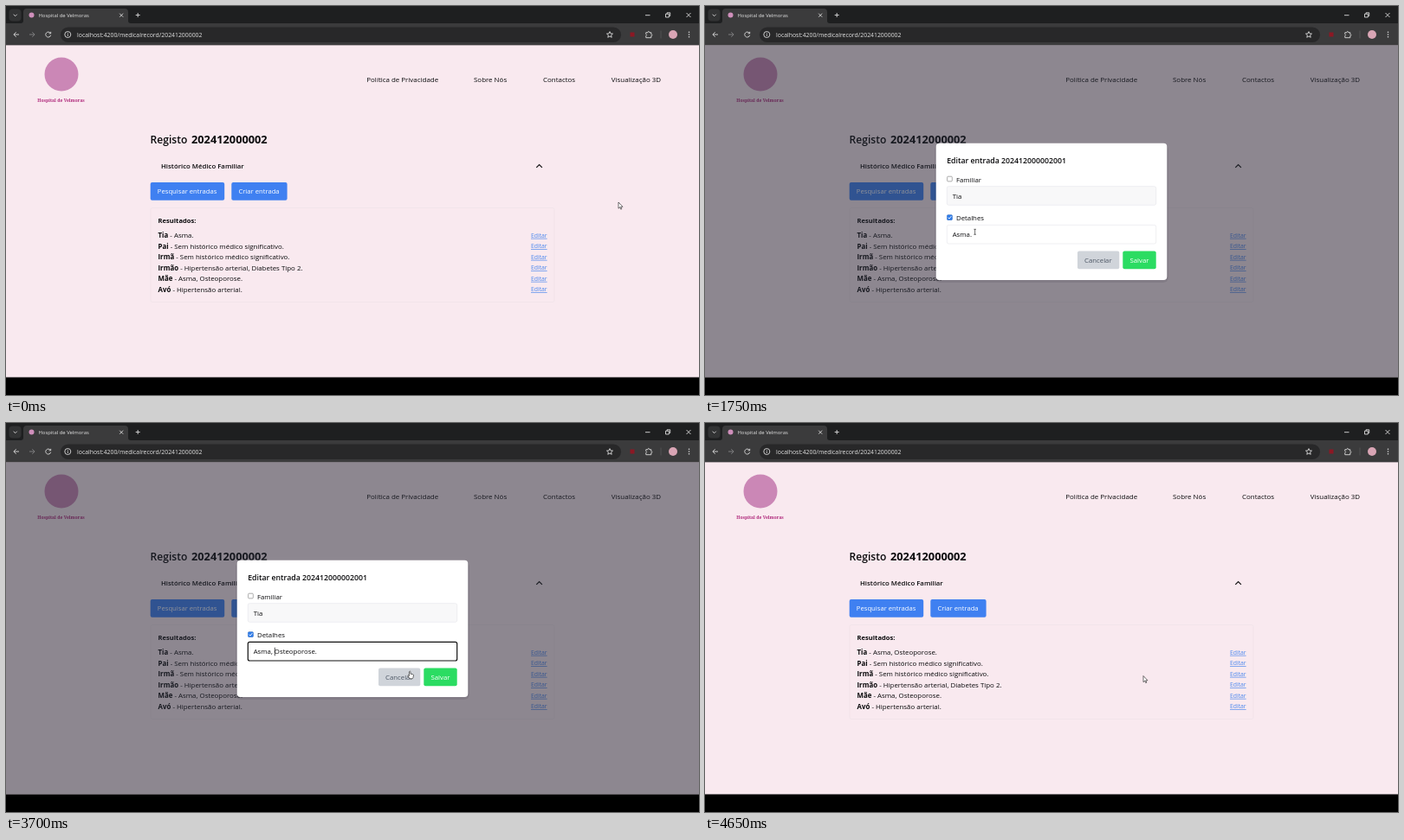
Write an HTML page that moves like this. It is 800x450 px and loops after 5000 ms.

```html
<!DOCTYPE html>
<html lang="pt">
<head>
<meta charset="utf-8">
<title>Hospital de Velmoras</title>
<style>
  html, body { margin: 0; width: 100%; height: 100%; overflow: hidden; background: #000; }
  svg { display: block; width: 800px; height: 450px; font: 7.8px "Open Sans", "Noto Sans", sans-serif; fill: #0b0b0d; }
  .nav { font-size: 7.95px; }
  .row { font-size: 7.9px; }
  .bold { font-weight: 700; }
  .semi { font-weight: 600; }
  .link { font-size: 6.8px; fill: #4b87ee; text-decoration: underline; }
  .white { fill: #fff; }
  .line { fill: none; stroke: #dcdcdc; stroke-width: .9; }
  .field { fill: #f8f8f9; stroke: #e4e5e9; stroke-width: .6; }
  .box { fill: #fff; stroke: #767676; stroke-width: .6; }
</style>
</head>
<body>
<svg viewBox="0 0 800 450">
  <!-- browser bar -->
  <rect width="800" height="45" fill="#1e1f20"/>
  <rect y="20" width="800" height="25.3" fill="#3b3b3c"/>
  <path d="M17 20q3 0 3-3V7q0-4 4-4h113q4 0 4 4v10q0 3 3 3z" fill="#3b3b3c"/>
  <rect x="3.500" y="3.500" width="14" height="14" rx="4" fill="#323334"/>
  <rect x="63" y="24.500" width="647" height="17.500" rx="8.750" fill="#282829"/>
  <circle cx="29.500" cy="10.500" r="3" fill="#cf8fbb"/>
  <text x="37.500" y="12.800" font-size="5.9" fill="#e3e3e3">Hospital de Velmoras</text>
  <text x="82" y="35.600" font-size="6.89" fill="#e3e3e3">localhost:4200/medicalrecord/202412000002</text>
  <g class="line">
    <path d="M8.700 9.700l2 2 2-2M131.200 8.700l4 4m0-4l-4 4M149.700 10.500h5M152.200 8v5"/>
    <path d="M738 10.700h5.500M761.500 9.200h3.800v3.800h-3.800zM763 9V7.800h3.700v3.700h-1.200M785.500 8l5 5m0-5l-5 5"/>
    <path d="M15 33H9m2.700-2.800L8.900 33l2.800 2.800M51.300 31.400a3 3 0 1 0 .4 2.400M51.700 29.800v2h-2"/>
    <path d="M27 33h6m-2.700-2.800l2.800 2.800-2.800 2.800" stroke="#858586"/>
    <circle cx="71.300" cy="33" r="3.500"/><path d="M71.300 32.500v2.300M71.300 30.900v.8"/>
    <path d="M697 29.600l1 2.300 2.500.2-1.900 1.700.6 2.500-2.200-1.300-2.200 1.300.6-2.500-1.900-1.700 2.500-.2z"/>
    <path d="M738.800 30.700h2v-.6q1-1.400 2 0v.6h2v2h.4q1.400 1 0 2h-.4v2h-6v-2.200q1.600-.8 0-1.800z"/>
    <path d="M756 28.500v9" stroke="#555"/>
  </g>
  <rect x="720.500" y="30.500" width="5" height="5" fill="#8c1824"/>
  <circle cx="770" cy="33" r="5" fill="#d9a5b5"/>
  <g fill="#dcdcdc"><circle cx="788.500" cy="30.300" r=".8"/><circle cx="788.500" cy="33" r=".8"/><circle cx="788.500" cy="35.700" r=".8"/></g>

  <!-- page -->
  <rect y="45.300" width="800" height="384.200" fill="#f9e9ef"/>
  <circle cx="64" cy="79" r="19.500" fill="#cb87b6"/>
  <text x="63.500" y="110.700" text-anchor="middle" font-family="Noto Serif, serif" font-size="5.05" font-weight="700" fill="#b02a7c">Hospital de Velmoras</text>
  <g class="nav">
    <text x="416.300" y="88.300">Política de Privacidade</text>
    <text x="540" y="88.300">Sobre Nós</text>
    <text x="620" y="88.300">Contactos</text>
    <text x="698.800" y="88.300">Visualização 3D</text>
  </g>
  <text x="166.500" y="158.800" font-size="12.1" class="semi">Registo</text>
  <text x="214" y="158.800" font-size="12.8" class="bold">202412000002</text>
  <text x="179" y="188.200" class="semi">Histórico Médico Familiar</text>
  <path d="M612.300 186.800l3.300-3.300 3.300 3.300" fill="none" stroke="#111" stroke-width="1.200"/>
  <g fill="#3f80f1">
    <rect x="166.700" y="204" width="85.500" height="20.700" rx="2"/>
    <rect x="260.300" y="204" width="64.300" height="20.700" rx="2"/>
  </g>
  <g class="white" font-size="7.68">
    <text x="174.800" y="217.300">Pesquisar entradas</text>
    <text x="268.400" y="217.300">Criar entrada</text>
  </g>
  <rect x="167" y="233.500" width="466" height="109" rx="2" fill="none" stroke="#f0e2e8" stroke-width=".7"/>
  <text x="175.500" y="251.200" font-size="7.6" class="bold">Resultados:</text>
  <g id="rows"></g>

  <!-- dialog -->
  <g id="dialog">
    <rect y="45.300" width="800" height="384.200" fill="#222633" opacity=".5"/>
    <rect x="265" y="160" width="270" height="160" rx="6" opacity=".08"/>
    <rect x="266.700" y="158.700" width="266.600" height="158.300" rx="4" fill="#fff"/>
    <text x="279.200" y="182" font-size="8.750" class="semi">Editar entrada 202412000002001</text>
    <rect class="box" x="279.600" y="197.200" width="5.700" height="5.700" rx="1"/>
    <text x="290" y="203.700">Familiar</text>
    <rect class="field" x="279.300" y="208.700" width="241.400" height="21.600" rx="2"/>
    <text x="285.700" y="222.700">Tia</text>
    <rect class="box" x="279.600" y="241.800" width="5.700" height="5.700" rx="1"/>
    <g id="tick">
      <rect x="279.300" y="241.500" width="6.300" height="6.300" rx="1.200" fill="#2f7cea"/>
      <path d="M280.600 244.700l1.300 1.400 2.500-3" fill="none" stroke="#fff" stroke-width=".9"/>
    </g>
    <text x="290" y="248.200">Detalhes</text>
    <rect id="field" class="field" x="279.300" y="253.400" width="241.400" height="21.600" rx="2"/>
    <text id="details" x="285.700" y="267.400"></text>
    <rect id="caret" y="259.700" width=".7" height="9.600"/>
    <rect x="430" y="283.400" width="48.300" height="20.800" rx="2" fill="#d0d4da"/>
    <text x="438" y="296.900" fill="#4b5563">Cancelar</text>
    <rect id="save" x="482.300" y="283.400" width="38.400" height="20.800" rx="2"/>
    <text x="490.400" y="296.900" class="white">Salvar</text>
  </g>

  <g id="pointer" fill="#fff" stroke="#111" stroke-width=".6" stroke-linejoin="round">
    <path id="arrow" d="M0 0v7.200l1.700-1.500 1.100 2.500 1-.5-1.100-2.400h2.300z"/>
    <path id="hand" d="M-.8 .7q.8-1.200 1.500 0v2.500l2.600.5q1 .3.900 1.300l-.5 2.500-.7 1.300H-.2l-2-3q-.5-1 .3-1.100l1.100.9z"/>
    <path id="beam" d="M-1.300-3h2.600M0-3v6M-1.300 3h2.600" fill="none"/>
  </g>
</svg>
<script>
const $ = id => document.getElementById(id);
const LOOP = 5000, STEP = 50;
const OPEN = 1000, CHECK = 1600, FOCUS = 1800, TYPE = 1850, BLUR = 4200, CLOSE = 4350, UPDATE = 4500;

const family = [
  ["Tia", "Asma."],
  ["Pai", "Sem histórico médico significativo."],
  ["Irmã", "Sem histórico médico significativo."],
  ["Irmão", "Hipertensão arterial, Diabetes Tipo 2."],
  ["Mãe", "Asma, Osteoporose."],
  ["Avó", "Hipertensão arterial."]
];
$("rows").innerHTML = family.map(([who, what], i) => {
  const y = 268 + i * 12.5;
  return `<text class="row" x="175.500" y="${y}"><tspan class="bold">${who}</tspan> - <tspan>${what}</tspan></text>
    <text class="link" x="606" y="${y - .2}">Editar</text>`;
}).join("");
const auntDetails = $("rows").querySelector("tspan:nth-of-type(2)");

// time, x, y
const route = [
  [0, 707, 227], [500, 632, 277], [850, 622, 264], [1100, 622, 264], [1500, 282, 245],
  [1650, 282, 245], [1800, 322, 267], [3350, 322, 267], [3850, 506, 292.5], [LOOP, 506, 292.5]
];

function pointerAt(t) {
  const i = route.findIndex(p => p[0] > t);
  const [t0, x0, y0] = route[i - 1], [t1, x1, y1] = route[i];
  const u = (t - t0) / (t1 - t0), k = u * u * (3 - 2 * u);
  return [x0 + (x1 - x0) * k, y0 + (y1 - y0) * k];
}

// Text of the edited field and the caret index within it
function editAt(t) {
  const added = ",Osteoporose.";
  if (t < TYPE) return ["Asma.", 5];
  if (t < 2850) {
    const text = "Asma" + added.slice(0, Math.ceil((t - TYPE) / 450 * added.length));
    return [text, text.length];
  }
  if (t < 3250) return ["Asma,Osteoporose.", t < 3000 ? 8 : Math.max(5, 7 - Math.floor((t - 3000) / 100))];
  return ["Asma, Osteoporose.", 6];
}

const show = (id, on) => $(id).setAttribute("visibility", on ? "inherit" : "hidden");
const inside = (x, y, l, t, r, b) => x >= l && x <= r && y >= t && y <= b;

function draw(t) {
  const open = t >= OPEN && t < CLOSE;
  const checked = t >= CHECK, focused = t >= FOCUS && t < BLUR;
  const [x, y] = pointerAt(t);
  const onSave = open && inside(x, y, 482, 283, 521, 304);
  const onLink = !open && inside(x, y, 606, 260, 625, 332);
  const onCheck = open && inside(x, y, 279, 241, 286, 248);
  const onCancel = open && inside(x, y, 430, 283, 478, 304);
  const onField = open && checked && inside(x, y, 279, 253, 521, 275);
  const hand = onSave || onLink || onCancel;

  $("dialog").setAttribute("display", open ? "inline" : "none");
  auntDetails.textContent = t < UPDATE ? "Asma." : "Asma, Osteoporose.";
  show("tick", checked);
  $("field").style.cssText = focused ? "fill:#fff;stroke:#111;stroke-width:1.2" : checked ? "fill:#fff" : "";
  $("save").setAttribute("fill", onSave ? "#1fb64f" : "#2bdc62");

  const [text, index] = editAt(t);
  $("details").textContent = text;
  if (open) $("caret").setAttribute("x", $("details").getEndPositionOfChar(index - 1).x);
  show("caret", focused);

  $("pointer").setAttribute("transform", `translate(${x} ${y})`);
  show("hand", hand);
  show("beam", onField);
  show("arrow", !hand && !onField);
  if (onCheck) show("arrow", true);
}

function frame() {
  const t = performance.now() % LOOP;
  draw(Math.floor(t / STEP) * STEP);
  requestAnimationFrame(frame);
}
frame();
</script>
</body>
</html>
```
